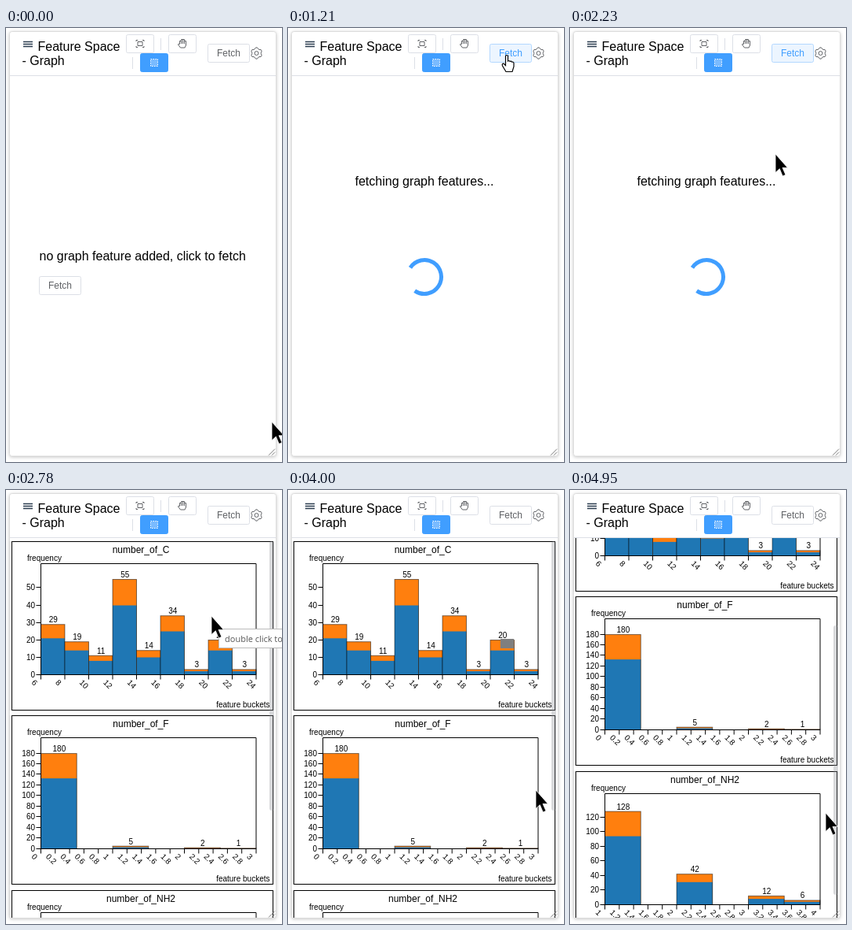
Write an HTML page that moves like this. It is 352 px wide and 551 px high and loops after 5.02 s.

```html
<!DOCTYPE html>
<html lang="en">
<head>
<meta charset="utf-8">
<title>Feature Space</title>
<style>
  html, body { margin: 0; width: 100%; height: 100%; overflow: hidden; background: #fff; }
  svg { display: block; font-family: "Liberation Sans", Arial, sans-serif; }
  .card { fill: #fff; stroke: #dcdcdc; filter: drop-shadow(0 1px 2px rgba(0,0,0,.22)); }
  .button rect { fill: #fff; stroke: #dcdfe6; }
  .button text { fill: #606266; font-size: 12px; text-anchor: middle; }
  .button.active rect { fill: #ecf5ff; stroke: #b3d8ff; }
  .button.active text { fill: #409eff; }
  .button.primary rect { fill: #409eff; stroke: #409eff; }
  .icon { fill: none; stroke: #606266; }
  .rule { stroke: #dcdfe6; }
  .chart { font-size: 10px; }
  .chart .title { font-size: 12px; text-anchor: middle; }
  .axis { fill: none; stroke: #000; }
  .outline { fill: none; stroke: #000; stroke-opacity: .5; }
</style>
</head>
<body>
<svg width="352" height="551" viewBox="0 0 352 551">
  <defs><clipPath id="view"><rect x="5" y="61" width="339" height="482"/></clipPath></defs>
  <rect class="card" x="4.5" y="4.5" width="340" height="539" rx="3"/>

  <g id="empty">
    <text x="42.5" y="295" font-size="16">no graph feature added, click to fetch</text>
    <g class="button"><rect x="42.5" y="315.5" width="53" height="23" rx="2"/><text x="69" y="331">Fetch</text></g>
  </g>

  <g id="loading">
    <text x="85.5" y="200" font-size="16">fetching graph features...</text>
    <circle id="spinner" cx="174" cy="316" r="21.5" fill="none" stroke="#409eff" stroke-width="5"
      pathLength="360" stroke-dasharray="272 88"/>
  </g>

  <g id="results" clip-path="url(#view)">
    <g id="charts"></g>
    <rect id="thumb" x="336" width="6" height="342" rx="3" fill="#909399" fill-opacity=".35"/>
  </g>

  <g id="header">
    <path class="rule" d="M5 60.5H344"/>
    <path d="M22 17.5H34M22 20.5H34M22 23.5H34" stroke="#2c3e50" stroke-width="1.4"/>
    <g font-size="16"><text x="40.5" y="29">Feature Space</text><text x="20.5" y="47">- Graph</text></g>
    <path class="rule" d="M197.5 13V28M161.5 37V52"/>
    <g class="button"><rect x="153.5" y="8.5" width="35" height="23" rx="2"/></g>
    <path class="icon" d="M168 17.5H174V22.5H168ZM166 17V15.5H168M174 15.5H176V17M166 23V24.5H168M174 24.5H176V23"/>
    <g class="button"><rect x="207.5" y="8.5" width="35" height="23" rx="2"/></g>
    <path class="icon" d="M222.5 25 219.5 21Q219.5 19.5 221.5 20.5V16.5H223.5V14.5H227.5V16.5H229.5V22L228 25ZM223.5 16V20M225.5 14.5V20M227.5 16V20"/>
    <g class="button primary"><rect x="171.5" y="32.5" width="35" height="23" rx="2"/></g>
    <rect x="184.5" y="39.5" width="9" height="9" fill="#fff" fill-opacity=".3" stroke="#fff" stroke-dasharray="1.5 1.5"/>
    <g class="button" id="fetch"><rect x="257.5" y="20.5" width="53" height="23" rx="2"/><text x="284" y="36">Fetch</text></g>
    <path class="icon" id="gear"/>
    <circle class="icon" cx="319.5" cy="32" r="2.5"/>
  </g>
  <path d="M335 542.5 343 534.5M339 542.5 343 538.5" stroke="#777"/>

  <g id="tooltip">
    <rect x="271.5" y="176.5" width="120" height="24" fill="#fff" stroke="#bbb"/>
    <text x="279" y="193" font-size="11" font-family="Open Sans, sans-serif" fill="#575757">double click to zoom</text>
  </g>
  <path id="arrow" d="M0 0V23.5L5.3 18.7 9.2 28 13 26.4 9 17.4H15.5Z" stroke="#fff" stroke-width=".8"/>
  <path id="hand" d="M-1.5 1.5Q0-.5 1.5 1.5V8Q3 6.8 4 8.5 5.6 7.5 6.6 9.2 8.5 8.5 9 10.5V15L7 21.5H-1L-5.5 14Q-6.5 11-4 11L-1.5 13.5Z"
    fill="#fff" stroke="#000" stroke-width="1.2"/>
</svg>
<script>
const LOOP = 5020, TICKS = 74;
const PITCH = 221.5, BASE = 234.5, LEFT = 44.5, WIDTH = 274.5;
const BLUE_SHARE = .74;
const $ = id => document.getElementById(id);

const charts = [
  { name: "number_of_C", totals: [29, 19, 11, 55, 14, 34, 3, 20, 3], scale: 2.2, yStep: 10, from: 6, to: 24, xStep: 2 },
  { name: "number_of_F", totals: [180, 0, 5, 0, 2, 1], scale: .672, yStep: 20, from: 0, to: 3, xStep: .2 },
  { name: "number_of_NH2", totals: [128, 0, 42, 0, 12, 6], scale: .925, yStep: 20, from: 1, to: 4, xStep: .2 },
];

const text = (x, y, content, extra = "") => `<text x="${x}" y="${y}" ${extra}>${content}</text>`;
const box = (x, y, w, h, extra) => `<rect x="${x}" y="${y}" width="${w}" height="${h}" ${extra}/>`;

function drawBar(c, total, slot) {
  if (!total) return "";
  const w = WIDTH / c.totals.length, x = LEFT + slot * w;
  const height = total * c.scale, top = BASE - height;
  const blue = Math.floor(total * BLUE_SHARE) * c.scale;
  return box(x, top, w, height, 'fill="#ff7f0e"')
    + box(x, BASE - blue, w, blue, 'fill="#1f77b4"')
    + box(x, top, w, height, 'class="outline"')
    + text(x + w / 2 + .5, top - 2.5, total, 'text-anchor="middle"');
}

function drawChart(c, index) {
  let labels = text(172, 80, c.name, 'class="title"') + text(27, 90, "frequency")
    + text(336.5, 276, "feature buckets", 'text-anchor="end"');
  let axes = `M${LEFT} 93.5H${LEFT + WIDTH}V${BASE}H${LEFT}Z`;

  for (let v = 0; v <= Math.max(...c.totals); v += c.yStep) {
    const y = Math.round(BASE - v * c.scale) - .5;
    axes += `M${LEFT} ${y}h-6`;
    labels += text(37, y + 3.5, v, 'text-anchor="end"');
  }
  const steps = Math.round((c.to - c.from) / c.xStep);
  for (let i = 0; i <= steps; i++) {
    const x = LEFT + WIDTH * i / steps;
    axes += `M${x} ${BASE}v6`;
    labels += text(0, 3.5, +(c.from + i * c.xStep).toFixed(1), `transform="translate(${x - 10} ${BASE + 8}) rotate(45)"`);
  }
  return `<g class="chart" transform="translate(0 ${Math.floor(PITCH * index)})">`
    + box(7.5, 65.5, 333, 214, 'class="axis"')
    + c.totals.map((total, slot) => drawBar(c, total, slot)).join("")
    + `<path class="axis" d="${axes}"/>${labels}</g>`;
}

function gearPath() {
  const points = [];
  for (let i = 0; i < 24; i++) {
    const a = (i + .5) * Math.PI / 12, r = i % 4 === 0 || i % 4 === 3 ? 7.2 : 5.8;
    points.push(`${319.5 + r * Math.sin(a)} ${32 + r * Math.cos(a)}`);
  }
  return `M${points.join("L")}Z`;
}

// Pointer moves in ticks; `via` bends the path.
const home = [339, 500];
const moves = [
  { start: 0, end: 7, to: [274, 52], via: [140, 214] },
  { start: 8, end: 11, to: [279, 34] },
  { start: 18, end: 20, to: [240, 140] },
  { start: 28, end: 32, to: [262, 160] },
  { start: 46, end: 50, to: [222, 357] },
  { start: 55, end: 59, to: [316, 381] },
  { start: 61, end: 66, to: [326, 410] },
];

const progress = (tick, start, end) => Math.max(0, Math.min(1, (tick - start) / (end - start)));
const ease = p => p * p * (3 - 2 * p);
const mix = (a, b, p) => a + (b - a) * p;

function pointerAt(tick) {
  let at = home;
  for (const { start, end, to, via } of moves) {
    const p = ease(progress(tick, start, end));
    at = at.map((a, i) => via
      ? mix(mix(a, via[i], p), mix(via[i], to[i], p), p)
      : mix(a, to[i], p));
  }
  return at;
}

const scrollAt = tick => 179 * ease(progress(tick, 61, 66)) - 28 * progress(tick, 72, 73);

const show = (id, on) => $(id).setAttribute("display", on ? "inline" : "none");
const place = (id, x, y) => $(id).setAttribute("transform", `translate(${x} ${y})`);

function render(ms) {
  const tick = Math.min(TICKS - 1, Math.floor(ms / LOOP * TICKS + .25));
  show("empty", tick < 13);
  show("loading", tick >= 13 && tick < 34);
  show("results", tick >= 34);
  show("tooltip", tick >= 41 && tick < 47);
  $("fetch").classList.toggle("active", tick >= 10 && tick < 34);
  $("spinner").setAttribute("transform", `rotate(${213 + (tick - 18) * 24} 174 316)`);

  const offset = Math.round(scrollAt(tick));
  place("charts", 0, -offset);
  $("thumb").setAttribute("y", 65 + offset * 482 / 680);

  const [x, y] = pointerAt(tick);
  const overButton = y < 44;
  show("arrow", !overButton);
  show("hand", overButton);
  place("arrow", x, y);
  place("hand", x, y);
}

// The hovered corner of one bar in the first chart stays grey.
$("charts").innerHTML = charts.map(drawChart).join("") + box(271, 189, 17, 12, 'fill="#7f7f7f"');
$("gear").setAttribute("d", gearPath());

const start = performance.now();
function frame() {
  render((performance.now() - start) % LOOP);
  requestAnimationFrame(frame);
}
frame();
</script>
</body>
</html>
```
